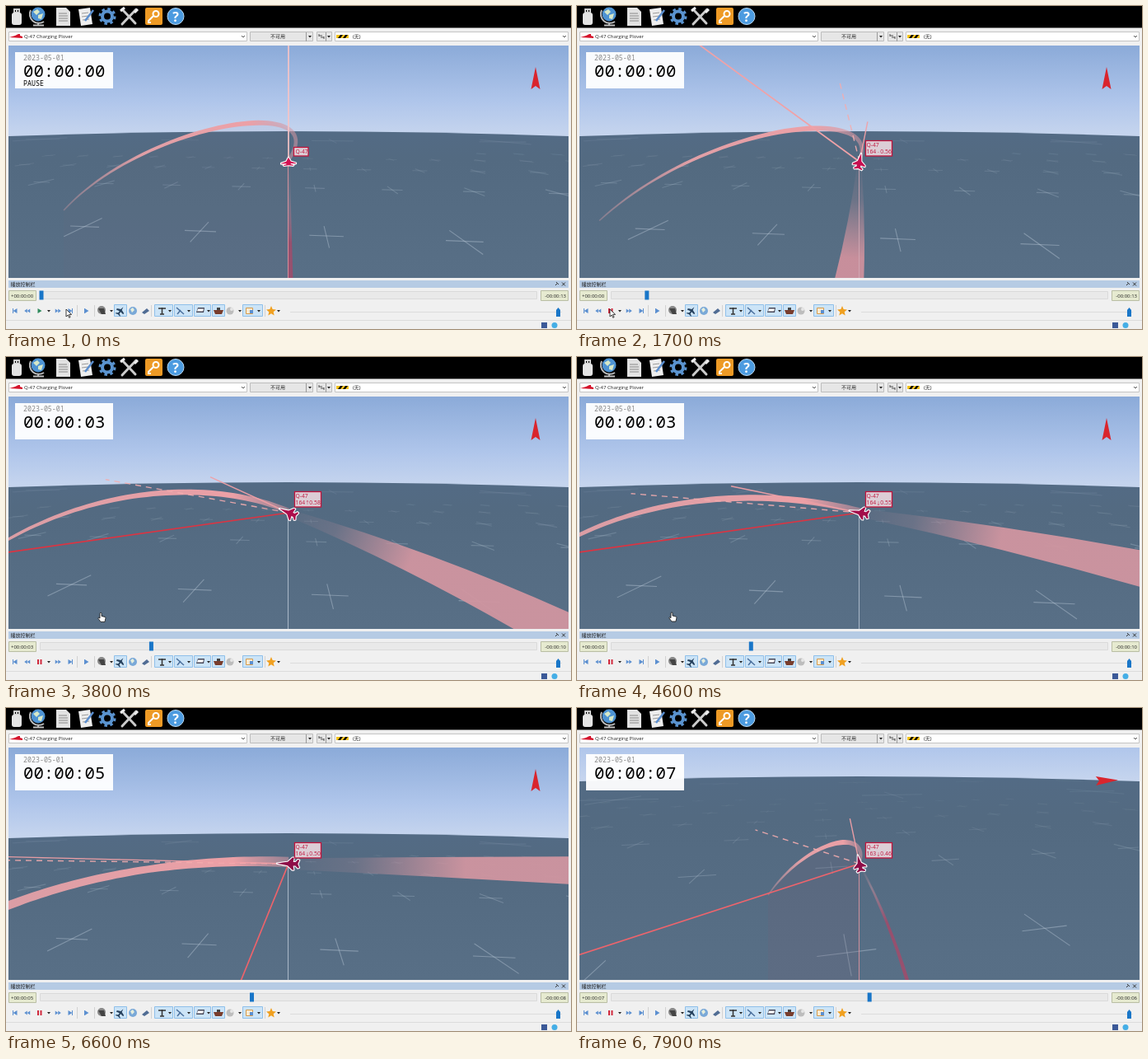
Write an HTML page with a canvas that moves like this. It is 686 by 392 pixels and loops after 8 s.

```html
<!DOCTYPE html>
<html lang="zh">
<head>
<meta charset="utf-8">
<title>Flight replay</title>
<style>
html, body { margin: 0; width: 100%; height: 100%; overflow: hidden; background: #f0f0f0; }
canvas, svg { position: absolute; left: 0; top: 0; width: 686px; height: 392px; }
text { font: 6px "Open Sans", "Noto Sans CJK SC", "Noto Sans CJK", sans-serif; fill: #222; }
.mono { font-family: "Noto Sans Mono", "DejaVu Sans Mono", monospace; }
.tag { font-size: 6.8px; fill: #c0143c; }
.box { fill: #fff; stroke: #c4c4c4; }
.on { fill: #cce4f7; stroke: #8fc0ea; }
.time { fill: #e6ead0; stroke: #b9bea4; }
.line { fill: none; stroke: #555; }
.blue { fill: #5b8fd0; }
</style>
</head>
<body>
<canvas id="scene" width="686" height="392"></canvas>
<svg viewBox="0 0 686 392">
  <defs>
    <path id="down" d="M-2-1h4l-2 2.6z" fill="#222"/>
    <path id="chev" d="M-2-1l2 2 2-2" class="line"/>
    <path id="fwd" d="M-2.5-3l5 3-5 3z"/>
    <path id="jet" d="M-7 0l5-1 2-5h2l-1 5 3 0 2-3h1l-1 4 1 4h-1l-2-3-3 0 1 5h-2l-2-5z"/>
  </defs>

  <!-- window frame around the view -->
  <path d="M0 0H686V392H0zM3 48V330H683V48z" fill="#f0f0f0" fill-rule="evenodd"/>
  <path d="M0 0H686V26.500H0z"/>

  <g id="topIcons">
    <path d="M9 3h8v6h-8z" fill="#ccc"/><rect x="7" y="8" width="12" height="15" rx="3" fill="#e4e4e4"/>
    <path d="M11 5h1v2h-1zM14 5h1v2h-1z"/>
    <circle cx="39" cy="10" r="8.500" fill="#4e93d3"/>
    <path d="M33 7l5-3 3 3-4 4zM39 11l6-2-2 7-4-1z" fill="#d6e8c8"/>
    <path d="M30 5a11 11 0 0 0 16 14M39 20v3M33 23.500h13" fill="none" stroke="#bbb" stroke-width="2"/>
    <path d="M61 2h12l5 5v17h-17z" fill="#e2e2e2"/>
    <path d="M64 9h10M64 12h11M64 15h11M64 18h11" stroke="#888"/>
    <path d="M88 4l14-2 3 20-14 2z" fill="#eee"/>
    <path d="M92 9l8-1M92 13l8-1M93 17l8-1" stroke="#999"/>
    <path d="M96 18L106 5" stroke="#5b8fd0" stroke-width="2.500"/>
    <circle cx="123" cy="12.500" r="6" fill="none" stroke="#5a93cf" stroke-width="4"/>
    <circle cx="123" cy="12.500" r="9" fill="none" stroke="#5a93cf" stroke-width="3" stroke-dasharray="3.500 3.570"/>
    <path d="M141 4l16 17M158 4l-17 18" stroke="#ccc" stroke-width="3" stroke-linecap="round"/>
    <path d="M139 6l5-4M156 8l4-4" stroke="#eee" stroke-width="3"/>
    <rect x="169" y="2" width="21" height="21" rx="2" fill="#ee9a25"/>
    <circle cx="182" cy="9.500" r="3.500" fill="none" stroke="#fff" stroke-width="2"/>
    <path d="M179 12l-6 6v2h3" fill="none" stroke="#fff" stroke-width="2"/>
    <circle cx="206" cy="12.500" r="10" fill="#4c9be0" stroke="#bddcf5"/>
    <text x="206" y="18.500" text-anchor="middle" style="font-size:16px;font-weight:700;fill:#fff">?</text>
  </g>

  <g id="selectors">
    <path class="box" d="M3.500 31.500h289v11h-289zM399.500 31.500h283v11h-283z"/>
    <path d="M296.500 31.500h76v11h-76zM377.500 31.500h18v11h-18z" fill="#e6e6e6" stroke="#bdbdbd"/>
    <path d="M364.500 32v11M388.500 32v11" stroke="#999"/>
    <path d="M4 38l7-2 4-2h2v2l3 1v2z" fill="#d5142c"/>
    <text x="22" y="39.300">Q-47 Charging Plover</text>
    <text x="330" y="39.300" text-anchor="middle">不可用</text>
    <text x="421" y="39.300">(无)</text>
    <use href="#chev" x="288" y="37"/><use href="#chev" x="678" y="37"/>
    <use href="#down" x="369" y="37"/><use href="#down" x="392" y="37"/>
    <path d="M380 36h4M382 38h4M380 34v3M386 37v3" class="line"/>
    <path d="M401 35h15v4h-15z" fill="#f2c21c"/>
    <path d="M403 39l3-4h3l-3 4zM409 39l3-4h3l-3 4z"/>
  </g>

  <g id="overlay">
    <rect x="11" y="56" width="119" height="44" fill="#fff" opacity=".95"/>
    <text class="mono" x="21" y="66" style="font-size:8.300px;fill:#8a8a8a">2023-05-01</text>
    <text class="mono" id="clock" x="21" y="86" style="font-size:20.700px;fill:#000"></text>
    <text class="mono" id="pause" x="21" y="96.500" style="font-size:8.300px;fill:#000">PAUSE</text>
    <path id="needle" d="M0-14L5.500 13 0 9-5.500 13z" fill="#d9252d"/>
    <rect id="tagBox" fill="#f0dce2" fill-opacity=".88" stroke="#c0143c" stroke-width="1.300"/>
    <text class="tag" id="tagName" x="351.500">Q-47</text>
    <g id="tagData">
      <text class="tag" id="alt" x="351.500" y="179.300"></text>
      <text class="tag" id="trend" x="366" y="179" text-anchor="middle" style="font-size:5.500px"></text>
      <text class="tag" id="mach" x="381.800" y="179.300" text-anchor="end"></text>
    </g>
  </g>

  <g id="player">
    <path d="M3 333h680v9H3z" fill="#b6cbe4"/>
    <text x="5.500" y="339.800">播放控制栏</text>
    <path d="M675 335.500l4 4m0-4l-4 4M667 339l3-3m-2-1l3 3" stroke="#333"/>
    <path class="time" d="M3.500 345.500h33v12h-33zM649.500 345.500h33v12h-33z"/>
    <text id="gone" x="6" y="353.700"></text>
    <text id="left" x="680" y="353.700" text-anchor="end"></text>
    <path d="M41.500 346.500h603v9h-603z" fill="#e9e9e9" stroke="#dadada"/>
    <rect id="handle" y="345.500" width="5" height="11" fill="#1976c8"/>

    <g class="blue">
      <use href="#fwd" transform="translate(11 370) scale(-1 1)"/><path d="M8 367h1v6h-1z"/>
      <use href="#fwd" transform="translate(24 370) scale(-.7 .8)"/><use href="#fwd" transform="translate(27.500 370) scale(-.7 .8)"/>
      <use href="#fwd" transform="translate(61.500 370) scale(.7 .8)"/><use href="#fwd" transform="translate(65 370) scale(.7 .8)"/>
      <use href="#fwd" x="78" y="370"/><path d="M80 367h1v6h-1z"/>
      <use href="#fwd" x="98" y="370"/><path d="M95 367h1v6h-1z"/>
    </g>
    <use id="play" href="#fwd" x="41" y="370" fill="#2f8a5c"/>
    <path id="bars" d="M38 367h2v6h-2zM41.500 367h2v6h-2z" fill="#d0283c"/>
    <path class="on" d="M131.500 362.500h15v14h-15zM180.500 362.500h22v14h-22zM204.500 362.500h22v14h-22zM228.500 362.500h20v14h-20zM250.500 362.500h15v14h-15zM287.500 362.500h24v14h-24z"/>
    <path d="M86.500 363v14M107.500 363v14M176.500 363v14M314.500 363v14" stroke="#d2d2d2"/>
    <circle cx="116" cy="369" r="5" fill="#888"/><path d="M112 367h7l2 7h-5z" fill="#444"/>
    <use href="#jet" transform="translate(139 370) rotate(125) scale(.85)" fill="#26405c"/>
    <circle cx="154" cy="370" r="5" fill="#7aa9d8"/><path d="M151 368l3-2 2 3-3 3z" fill="#e6eedd"/>
    <path d="M165 372l6-5 3 3-6 4z" fill="#506c94"/>
    <path d="M185 367h9M189.500 366v8M187 374h5" fill="none" stroke="#333" stroke-width="1.500"/>
    <path d="M207 366l9 8M212 369l-4 5" stroke="#4a6f9c" stroke-width="1.500"/>
    <path d="M233 366h8l-1 6h-9z" fill="#445"/><path d="M233 367.500h7l-1 3h-7z" fill="#fff"/>
    <path d="M252 369h12l-2 5h-8z" fill="#793c2c"/><path d="M256 366h4v3h-4z" fill="#444"/>
    <circle cx="272" cy="370" r="4.500" fill="#bdbdbd"/><circle cx="274" cy="368" r="2" fill="#e6e6e6"/>
    <path d="M291.500 366.500h8v7h-8z" fill="#f8ead0" stroke="#d59b4c"/><path d="M296 369h4v4h-4z" class="blue"/>
    <path d="M322 364l1.700 4 4.300.4-3.300 2.900 1 4.300-3.700-2.300-3.700 2.300 1-4.300-3.300-2.900 4.300-.4z" fill="#f0a020"/>
    <g id="drops"></g>
    <path d="M345 371.500h330" stroke="#dcdcdc"/>
    <path d="M668 369l2.500-3 2.500 3v8h-5z" fill="#1976c8"/>
    <path d="M0 381.500h686" stroke="#dcdcdc"/>
    <rect x="650" y="384" width="7" height="7" fill="#3b5998"/>
    <circle cx="666" cy="387.500" r="3.500" fill="#45aee6"/>
  </g>

  <g id="pointer" fill="#fff" stroke="#111" stroke-width=".8">
    <path id="arrow" d="M0 0v9l2.200-2 1.500 3.300 1.400-.7-1.500-3.200h3z"/>
    <path id="hand" d="M-1-4c0-1.500 2-1.500 2 0v3l4 1c1 .3 1 1 .8 2L5 6H0l-3-4c-.5-1 .5-1.500 2-.3z"/>
  </g>
</svg>

<script>
const $ = id => document.getElementById(id);
const g = $('scene').getContext('2d');
const LOOP = 8000, START = 740, SWING = 6600, LENGTH = 13.99;
const CX = 343, CY = 189, LEFT = 3, RIGHT = 683, TOP = 48, BOTTOM = 330;
const PINK = [208, 149, 160], CRIMSON = [184, 64, 98];

const mix = (a, b, u) => a + (b - a) * u;
const blend = (a, b, u) => a.map((v, i) => mix(v, b[i], u));
const rgba = ([r, gr, b], a = 1) => `rgba(${r | 0},${gr | 0},${b | 0},${a})`;
const rad = deg => deg * Math.PI / 180;
const polar = (deg, r) => [CX + r * Math.cos(rad(deg)), CY + r * Math.sin(rad(deg))];
const bell = (s, width) => Math.exp(-((s / width) ** 2));
function ease(from, to, v) {
  const u = Math.max(0, Math.min(1, (v - from) / (to - from)));
  return u * u * (3 - 2 * u);
}

// State of the flight after s seconds of replay, with the camera swung by w (0 to 1).
function pose(s, w) {
  const begun = Math.min(1, s), turned = Math.max(0, s - .96), near = bell(s, 2.6);
  const course = 102 * Math.exp(-((turned / 1.6) ** 1.3)) - 13 * (1 - begun);
  const drift = 76 * Math.exp(-turned / 1.05);
  return {
    s, w, begun,
    course: mix(course, 78, w),
    drift: mix(drift, 18, w),
    noseLen: mix(50 + 1.9 * s ** 3, 56, w) * begun,
    driftLen: mix(60 + 45 * s + 3 * s * s, 133, w) * begun,
    beam: -90 - 98 * ease(0, 1.8, s) - 60 * ease(4.6, 5.9, s) + 50 * w,
    curve: [
      blend([-32 + 102 * bell(s, 1.3), 248 + 14 * Math.sin(1.15 * s)], [232, 227], w),
      blend([60 + 110 * near, 140 + 2.1 * s * s], [280, 158], w),
      blend([190 + 210 * near, 105 + 12.9 * s], [355, 145], w),
      [CX, CY - 2]],
    widths: blend([1.5 + .045 * s ** 3, 6 + .08 * s * s, 4 + .25 * s * s], [1.5, 6, 4], w),
    farAlpha: mix(mix(.3, .9, ease(.8, 2.2, s)), .3, w),
    veil: mix(.05 * (1 - begun), .22, w),
    wakeNear: mix(1.5 + .9 * s, 1, w),
    wakeSpread: mix(.01 + .1 * begun * Math.exp(-turned / 3), .008, w),
    wakeBend: .2 * Math.min(1, s / 2),
    wakeFade: mix(90 + 20 * s, 70, w),
    red: Math.max(1 - begun, w),
    ground: blend([389 + .45 * s * s, 279 + 4.1 * s - .26 * s * s], [328, 297], w),
    mach: Math.min(.53 + .031 * s, .664 - .0285 * s)
  };
}

function line(x0, y0, x1, y1, color, width, dash = []) {
  g.strokeStyle = color;
  g.lineWidth = width;
  g.setLineDash(dash);
  g.beginPath();
  g.moveTo(x0, y0);
  g.lineTo(x1, y1);
  g.stroke();
  g.setLineDash([]);
}

function drawWorld(h) {
  const top = h + 9;
  let fill = g.createLinearGradient(0, top - 110, 0, top + 5);
  fill.addColorStop(0, '#88a8d7');
  fill.addColorStop(.65, '#b0c6eb');
  fill.addColorStop(1, '#c6d5ee');
  g.fillStyle = fill;
  g.fillRect(LEFT, TOP, 680, 282);

  fill = g.createLinearGradient(0, top, 0, BOTTOM);
  fill.addColorStop(0, '#536b85');
  fill.addColorStop(.2, '#536a81');
  fill.addColorStop(1, '#586f86');
  g.fillStyle = fill;
  g.beginPath();
  g.moveTo(LEFT, BOTTOM);
  g.lineTo(LEFT, top + 6);
  g.quadraticCurveTo(CX, top - 6, RIGHT, top + 6);
  g.lineTo(RIGHT, BOTTOM);
  g.fill();
}

// Crosses on the ground plane, laid out on a rotated square grid.
function drawGrid(ax, az, size, h, focal, angle, count, fade, rise) {
  const ux = Math.cos(angle), uz = Math.sin(angle), arm = size * .13;
  const project = (x, z) => [CX + x * focal / z, h + focal / z];
  for (let i = -count; i <= count; i++) for (let j = -count; j <= count; j++) {
    const x = ax + size * (i * ux - j * uz), z = az + size * (i * uz + j * ux);
    if (z - arm < .3 || focal / z < rise) continue;
    const color = `rgba(190,206,220,${.42 * Math.min(1, (fade / z) ** 1.6)})`;
    for (const [dx, dz] of [[ux, uz], [-uz, ux]])
      line(...project(x - dx * arm, z - dz * arm), ...project(x + dx * arm, z + dz * arm), color, 1.1);
  }
}

// The route ahead: a Bezier ribbon from its far end to the aircraft.
function drawRoute({ curve: [a, b, c, d], widths: [far, mid, near], farAlpha, veil }) {
  const N = 50, mids = [], upper = [], lower = [];
  for (let n = 0; n <= N; n++) {
    const u = n / N, v = 1 - u;
    const [x, y] = [0, 1].map(k => v * v * v * a[k] + 3 * v * v * u * b[k] + 3 * v * u * u * c[k] + u * u * u * d[k]);
    const [dx, dy] = [0, 1].map(k => v * v * (b[k] - a[k]) + 2 * v * u * (c[k] - b[k]) + u * u * (d[k] - c[k]));
    const half = (u < .6 ? mix(far, mid, u / .6) : mix(mid, near, (u - .6) / .4)) / 2 / Math.hypot(dx, dy);
    mids.push([Math.min(x, CX), y]);
    upper.push([x + dy * half, y - dx * half]);
    lower.unshift([x - dy * half, y + dx * half]);
  }
  const area = (pts, style) => {
    g.fillStyle = style;
    g.beginPath();
    pts.forEach(p => g.lineTo(...p));
    g.fill();
  };
  area([[a[0], BOTTOM], ...mids, [CX, BOTTOM]], `rgba(112,95,120,${veil})`);
  const fill = g.createLinearGradient(a[0], 0, CX, 0);
  fill.addColorStop(0, `rgba(230,162,168,${farAlpha})`);
  fill.addColorStop(.35, 'rgba(232,162,168,.95)');
  fill.addColorStop(.82, 'rgba(236,160,166,1)');
  fill.addColorStop(1, 'rgba(210,150,162,.55)');
  area([...upper, ...lower], fill);
}

// The route behind: a strip that widens towards the viewer.
function drawWake(p) {
  const reach = 440, nx = -Math.sin(rad(p.course)), ny = Math.cos(rad(p.course));
  const color = blend(PINK, CRIMSON, p.red), alpha = mix(.95, .65, p.red);
  const side = (deg, r, k) => {
    const [x, y] = polar(deg, r), w = k * (p.wakeNear + r * p.wakeSpread);
    return [x + nx * w, y + ny * w];
  };
  const bent = p.course * (1 - p.wakeBend);
  const fill = g.createRadialGradient(CX, CY, 8, CX, CY, 8 + p.wakeFade);
  fill.addColorStop(0, rgba(PINK, .05));
  fill.addColorStop(.35, rgba(PINK, mix(.18, .45, p.w)));
  fill.addColorStop(1, rgba(color, alpha));
  g.fillStyle = fill;
  g.beginPath();
  g.moveTo(...side(bent, 4, -1));
  g.quadraticCurveTo(...side(bent, reach / 2, -1), ...side(p.course, reach, -1));
  g.lineTo(...side(p.course, reach, 1));
  g.quadraticCurveTo(...side(bent, reach / 2, 1), ...side(bent, 4, 1));
  g.fill();
}

function drawJet({ s, w, begun, course }) {
  const half = [[-15,0], [-6,-2], [-1,-3], [5,-10], [7,-10], [6,-3], [9,-3], [12,-7], [14,-6], [12,0]];
  const shape = [...half, ...half.slice(1, -1).reverse().map(([x, y]) => [x, -y])];
  const long = mix(.35 + .3 * begun + .05 * s, .72, w), span = .9 - .15 * begun;
  g.save();
  g.translate(CX, CY);
  g.rotate(rad(course));
  g.beginPath();
  for (const [x, y] of shape) g.lineTo(x * long, y * span);
  g.closePath();
  g.restore();
  g.strokeStyle = '#fff';
  g.lineWidth = 2.2;
  g.lineJoin = 'round';
  g.stroke();
  g.fillStyle = rgba(blend([210, 16, 82], [142, 14, 72], Math.min(1, s / 5.5)));
  g.fill();
}

function drawScene(p) {
  const { s, w } = p;
  const h = mix(143, 74, w), focal = mix(213, 316, w), angle = rad(mix(-3.5, -80, w));
  g.save();
  g.beginPath();
  g.rect(LEFT, TOP, 680, 282);
  g.clip();
  drawWorld(h);
  const depth = p.ground[1] - h;
  drawGrid((p.ground[0] - CX) / depth, focal / depth, mix(1.164, 1.25, w), h, focal, angle, 7, 1.9, 36);
  drawGrid(mix(2, 2.9, w), mix(1, .9, w), 9.3, h, focal, angle, 2, 4, 13);

  drawRoute(p);
  drawWake(p);
  const warm = Math.max(1 - s / 2.2, w);
  line(342.5, CY, 342.5, BOTTOM, rgba(blend([185, 198, 212], [230, 150, 160], warm), .85), 1);
  const beam = blend([246, 196, 198], [220, 52, 66], ease(.4, 2.2, s));
  line(CX, CY, ...polar(p.beam, 700), rgba(blend(beam, [238, 100, 108], ease(4.6, 5.9, s))), 1.7);
  line(CX, CY, ...polar(p.drift - 180, p.driftLen), 'rgba(243,172,174,.9)', 1.4, [7, 6]);
  line(CX, CY, ...polar(p.course - 180, p.noseLen), 'rgba(240,160,166,.95)', 1.4);
  drawJet(p);
  g.restore();
}

const stamp = s => '00:00:' + String(Math.floor(s)).padStart(2, '0');
const show = (id, on) => $(id).style.display = on ? '' : 'none';
const move = (id, value) => $(id).setAttribute('transform', value);
function box(x, y, width, height) {
  Object.entries({ x, y, width, height }).forEach(([k, v]) => $('tagBox').setAttribute(k, v));
}

function drawPanel(t, { s, w, mach }) {
  const run = t >= START;
  $('clock').textContent = stamp(s);
  $('gone').textContent = '+' + stamp(s);
  $('left').textContent = '-' + stamp(LENGTH - s);
  $('handle').setAttribute('x', 40.5 + s * 43.6);
  show('pause', !run);
  show('play', !run);
  show('bars', run);

  show('tagData', run);
  if (run) box(350.5, 163.5, 32, 18.5); else box(349.5, 171.5, 17.5, 10.5);
  $('tagName').setAttribute('y', run ? 170.5 : 179.3);
  $('alt').textContent = s < 6.5 ? '164' : '163';
  $('trend').textContent = s < 1.4 ? '-' : s < 3.7 ? '↑' : '↓';
  $('mach').textContent = mach.toFixed(2);
  move('needle', `translate(643 88) rotate(${w * 88})`);

  const reach = ease(1800, 2600, t);
  const x = 73 - 33 * ease(0, 600, t) + 75 * reach;
  const y = 368 - 41 * reach - 12 * ease(3000, 3900, t) + 85 * ease(5400, 6000, t);
  move('pointer', `translate(${x} ${y})`);
  show('hand', y < BOTTOM);
  show('arrow', y >= BOTTOM);
}

$('drops').innerHTML = [52, 128, 199, 222, 246, 284, 307, 331]
  .map(x => `<use href="#down" x="${x}" y="370"/>`).join('');

const begin = performance.now();
function frame() {
  const t = Math.floor((performance.now() - begin) % LOOP / 100) * 100;
  const p = pose(Math.max(0, t - START) / 1000, ease(SWING, LOOP - 100, t));
  drawScene(p);
  drawPanel(t, p);
  requestAnimationFrame(frame);
}
frame();
</script>
</body>
</html>
```
